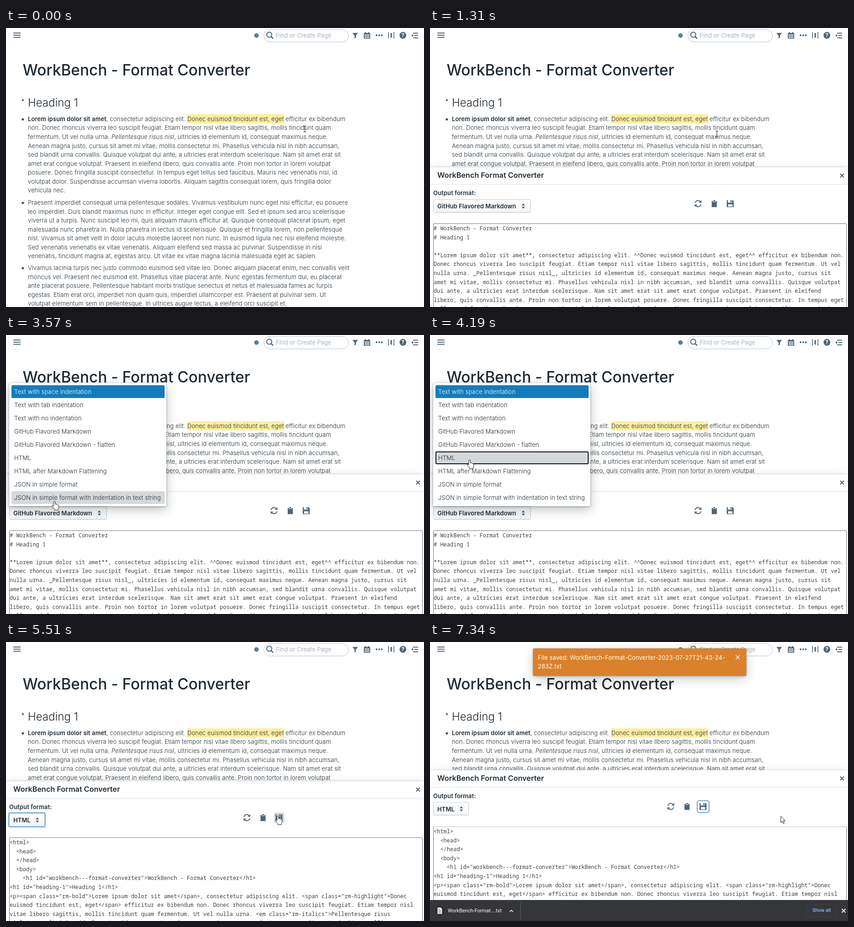
Recreate the animation shown at these times as an HTML page. Size 917 px wide and 611 px high, loop 7410 ms.

```html
<!DOCTYPE html>
<html lang="en">
<head>
<meta charset="utf-8">
<title>Format Converter</title>
<style>
html, body { margin: 0; width: 100%; height: 100%; overflow: hidden; background: #fff; }
#stage { position: relative; width: 917px; height: 611px; overflow: hidden; background: #fff;
  font: 300 13px/19.5px Inter, sans-serif; letter-spacing: .165px; color: #202b33; }
#stage div, #stage svg { position: absolute; }
svg { overflow: visible; }
.t, pre { position: absolute; margin: 0; white-space: pre; }
.icon { fill: #506575; }
.line { fill: none; stroke: #506575; stroke-width: 2; }
.b { font-weight: 600; letter-spacing: .08px; }
.anim { animation: 7410ms linear infinite; }
mark { background: #ffeea0; color: inherit; padding: 2px 1px; margin: 0 -1px; }

#title { left: 36.5px; top: 72px; font-size: 33.43px; font-weight: 500; letter-spacing: 0; line-height: 40px; }
#head { left: 48px; top: 149px; font-size: 24.1px; letter-spacing: 0; line-height: 30px; }
#search { left: 565px; top: 2.5px; width: 184.5px; height: 26px; border: 1px solid #bac4cb; border-radius: 15px; }
#hint { left: 592px; top: 7px; font-weight: 400; font-size: 12.95px; letter-spacing: 0; color: #a3b1bc; }

#panel { left: 0; top: 305px; width: 917px; height: 340px; background: #fff;
  box-shadow: 0 0 0 1px rgba(16,22,26,.08), 0 2px 7px rgba(16,22,26,.2), 0 5px 22px rgba(16,22,26,.15);
  animation-name: slide; }
#bar-line { left: 0; top: 37px; width: 917px; height: 1px; background: #dfe3e6; }
#name { left: 16px; top: 7px; font-size: 16.3px; letter-spacing: 0; line-height: 21px; }
#label { left: 7px; top: 46.5px; font-weight: 700; letter-spacing: 0; color: #3a4650; }
.select { left: 7px; top: 70px; height: 27px; border: 1px solid #c3cad0; border-radius: 3px;
  background: linear-gradient(#fff, #f3f5f7); box-shadow: 0 1px 1px rgba(16,22,26,.08); line-height: 28px; }
.select .t { left: 8px; top: 0; }
#md { width: 212px; animation-name: before; }
#html { width: 76px; animation-name: after; }
#ring { left: 5px; top: 68px; width: 78px; height: 29px; border: 2px solid #68aed8; border-radius: 4px; animation-name: ring; }
#tools { left: 570px; top: 60px; animation-name: tools; }
#hover { fill: #d9dfe4; animation-name: hover; }
#focus { fill: none; stroke: #5fa6d6; stroke-width: 2; animation-name: focus; }
#area { left: 7px; top: 123px; width: 905px; height: 240px; border: 1px solid #767676; border-radius: 2px; }
pre { left: 0; top: .3px; font: 12px/19.55px "Noto Sans Mono", "DejaVu Sans Mono", monospace; letter-spacing: 0; color: #404040; }
#mdText { animation-name: before; }
#htmlText { animation-name: after; }

#menu { left: 7px; top: 105px; width: 345px; height: 270px; background: #fff; border-radius: 3px;
  box-shadow: 0 0 0 1px rgba(16,22,26,.12), 0 2px 4px rgba(16,22,26,.2), 0 8px 24px rgba(16,22,26,.25);
  transform-origin: 50% 100%; animation-name: menu; }
#menu ul { margin: 0; padding: 5px 0 0 5px; list-style: none; line-height: 28.95px; position: relative; }
#menu li { width: 330px; padding-left: 6px; white-space: pre; }
#menu li:first-child { background: #137cbd; color: #fff; border-radius: 2px; height: 28px; line-height: 28px; margin-bottom: .95px; }
#pick { left: 5px; top: 150px; width: 336px; height: 28px; border-radius: 3px; background: #d5d9dc; animation-name: pick; }
#outline { left: 5px; top: 150px; width: 332px; height: 24px; border: 2px solid #111; border-radius: 3px; animation-name: outline; }

#toast { left: 226px; top: 14px; width: 468px; height: 60px; border-radius: 3px; background: #d9822b; color: #fff;
  font-weight: 400; letter-spacing: .07px;
  box-shadow: 0 0 0 1px rgba(16,22,26,.1), 0 2px 4px rgba(16,22,26,.2), 0 8px 24px rgba(16,22,26,.2);
  animation-name: toast; }
#toast .t { left: 10.5px; top: 10.5px; }
#shelf { left: 0; top: 565px; width: 917px; height: 46px; background: #35363a; color: #fff;
  font: 11px/16px Roboto, sans-serif; letter-spacing: 0; animation-name: shelf; }
#file { left: 39px; top: 16px; animation-name: reveal; }
#all { left: 826px; top: 9px; width: 64px; height: 26px; border: 1px solid #414246; border-radius: 4px;
  color: #8ab4f8; font-weight: 500; font-size: 10.8px; line-height: 26px; text-align: center; }
#end { animation-name: widen; }
#progress { fill: none; stroke: #8ab4f8; stroke-width: 1.6; animation-name: pulse; }
#drop { left: 28px; top: 544px; animation-name: drop; }
#cursor { left: 0; top: 0; animation-name: move; }
#cursor path { fill: #fff; stroke: #111; stroke-linejoin: round; }
#cursor #beam { fill: none; animation-name: beam; }
#arrow { animation-name: arrow; }
#hand { animation-name: hand; }

@keyframes slide {
  0%, 14.845% { transform: translateY(316px); animation-timing-function: cubic-bezier(.4,1,.75,.9); }
  17.544%, 77.19% { transform: none; }
  79.08%, 100% { transform: translateY(-24.5px); }
}
@keyframes before { 0% { opacity: 1; animation-timing-function: step-end; } 59.38%, 100% { opacity: 0; } }
@keyframes after { 0% { opacity: 0; animation-timing-function: step-end; } 59.38%, 100% { opacity: 1; } }
@keyframes ring {
  0% { opacity: 0; animation-timing-function: step-end; }
  59.38% { opacity: 1; animation-timing-function: step-end; }
  76.25%, 100% { opacity: 0; }
}
@keyframes tools { 0% { transform: none; animation-timing-function: step-end; } 59.38%, 100% { transform: translateX(-59.7px); } }
@keyframes hover {
  0% { opacity: 0; animation-timing-function: step-end; }
  73.4% { opacity: 1; animation-timing-function: step-end; }
  76.25%, 100% { opacity: 0; }
}
@keyframes focus { 0% { opacity: 0; animation-timing-function: step-end; } 76.25%, 100% { opacity: 1; } }
@keyframes menu {
  0%, 42.65% { opacity: 0; transform: scale(.6); animation-timing-function: cubic-bezier(.2,.9,.4,1.05); }
  44.5%, 57.9% { opacity: 1; transform: none; }
  59.38%, 100% { opacity: 0; transform: scale(.9); }
}
@keyframes pick {
  0% { opacity: 0; transform: none; animation-timing-function: step-end; }
  46.4% { opacity: 1; transform: translateY(87px); animation-timing-function: step-end; }
  48.3% { opacity: 1; transform: translateY(58px); animation-timing-function: step-end; }
  50.2% { opacity: 1; transform: translateY(29px); animation-timing-function: step-end; }
  52.1%, 100% { opacity: 1; transform: none; }
}
@keyframes outline { 0% { opacity: 0; animation-timing-function: step-end; } 55.6%, 100% { opacity: 1; } }
@keyframes toast {
  0%, 77.19% { opacity: 0; transform: translateY(-90px); animation-timing-function: cubic-bezier(.3,.8,.5,1); }
  80.03% { opacity: 1; transform: translateY(1.6px); }
  81.9%, 100% { opacity: 1; transform: none; }
}
@keyframes shelf { 0%, 77.19% { transform: translateY(48px); } 79.08%, 100% { transform: none; } }
@keyframes drop {
  0%, 78.14% { opacity: 0; transform: translateY(-45px); }
  79.5% { opacity: .85; transform: translateY(-12px); }
  80.5% { opacity: .85; transform: none; }
  87.5%, 100% { opacity: 0; transform: translateY(36px); }
}
@keyframes reveal {
  0%, 86.64% { clip-path: inset(0 100% 0 0); animation-timing-function: ease-out; }
  91.77%, 100% { clip-path: inset(0); }
}
@keyframes widen {
  0%, 86.64% { transform: none; animation-timing-function: ease-out; }
  91.77%, 100% { transform: translateX(112px); }
}
@keyframes pulse { 0%, 86.64% { opacity: 1; } 91.77% { opacity: .15; } 95.41% { opacity: .7; } 98.9%, 100% { opacity: 0; } }
@keyframes move {
  0%, 14.845% { transform: translate(655.5px, 221px); }
  17.68% { transform: translate(629.5px, 232px); }
  21.46% { transform: translate(520px, 320px); }
  25.24% { transform: translate(380px, 385px); animation-timing-function: ease-out; }
  30.9%, 38.19% { transform: translate(155px, 412px); }
  40.49%, 45.48% { transform: translate(112px, 389px); animation-timing-function: ease-in-out; }
  53.85%, 58.4% { transform: translate(87px, 273.5px); animation-timing-function: ease-in-out; }
  64.9% { transform: translate(160px, 390px); animation-timing-function: ease-in-out; }
  74.36%, 77.19% { transform: translate(596.5px, 380.5px); }
  80.03% { transform: translate(638px, 381.5px); animation-timing-function: ease-out; }
  85.7%, 100% { transform: translate(769.5px, 381.5px); }
}
@keyframes beam { 0% { opacity: 1; animation-timing-function: step-end; } 20.4%, 100% { opacity: 0; } }
@keyframes arrow {
  0% { opacity: 0; animation-timing-function: step-end; }
  20.4% { opacity: 1; animation-timing-function: step-end; }
  39.5% { opacity: 0; animation-timing-function: step-end; }
  59.4% { opacity: 1; animation-timing-function: step-end; }
  73.4% { opacity: 0; animation-timing-function: step-end; }
  77.6%, 100% { opacity: 1; }
}
@keyframes hand {
  0% { opacity: 0; animation-timing-function: step-end; }
  39.5% { opacity: 1; animation-timing-function: step-end; }
  59.4% { opacity: 0; animation-timing-function: step-end; }
  73.4% { opacity: 1; animation-timing-function: step-end; }
  77.6%, 100% { opacity: 0; }
}
</style>
</head>
<body>
<div id="stage">
  <div id="search"></div>
  <div id="hint" class="t">Find or Create Page</div>
  <svg width="917" height="611">
    <path class="line" d="M16 11h16M16 15.7h16M16 20.4h16M893 11.2h11M895.5 16.3h8.5M893 21.4h11"/>
    <circle cx="549.5" cy="16.5" r="5" fill="#568294"/>
    <g class="line"><circle cx="577.5" cy="14.7" r="5.6"/><path d="M581.5 18.7l4.6 4.4" stroke-width="2.6"/></g>
    <g class="icon">
      <path d="M760 10.8h12.2l-4.6 5.6v4.4l-3 2.2v-6.6z"/>
      <path d="M785 11h14v12.5h-14zM787.5 9h2.4v3h-2.4zM794 9h2.4v3H794z"/>
      <circle cx="813" cy="16" r="2"/><circle cx="818.7" cy="16" r="2"/><circle cx="824.4" cy="16" r="2"/>
      <path d="M838.2 9h1.6v14h-1.6zM850.4 9h1.6v14h-1.6zM843.6 11h3v10h-3z"/>
      <circle cx="870.7" cy="16" r="7.4"/>
      <path d="M889 16.3l4.2-3.2v6.4z"/>
    </g>
    <path d="M787 15h10M787 18h10M787 21h10" stroke="#fff" stroke-width="2" stroke-dasharray="2 .7"/>
    <text x="870.7" y="20.3" fill="#fff" font-size="12" font-weight="700" text-anchor="middle">?</text>
    <g fill="#46525c">
      <circle cx="37" cy="158" r="2.1"/><circle cx="37" cy="200" r="2.6"/>
      <circle cx="37" cy="383" r="2.6"/><circle cx="37" cy="526" r="2.6"/>
    </g>
  </svg>
  <div id="title" class="t">WorkBench - Format Converter</div>
  <div id="head" class="t">Heading 1</div>
  <div class="t" style="left:48px;top:189.5px"><span class="b">Lorem ipsum dolor sit amet</span>, consectetur adipiscing elit. <mark>Donec euismod tincidunt est, eget</mark> efficitur ex bibendum
non. Donec rhoncus viverra leo suscipit feugiat. Etiam tempor nisl vitae libero sagittis, mollis tincidunt quam</div>
  <div class="t" style="left:48px;top:229.3px">fermentum. Ut vel nulla urna. <i>Pellentesque risus nisl</i>, ultricies id elementum id, consequat maximus neque.
Aenean magna justo, cursus sit amet mi vitae, mollis consectetur mi. Phasellus vehicula nisl in nibh accumsan,
sed blandit urna convallis. Quisque volutpat dui ante, a ultricies erat interdum scelerisque. Nam sit amet erat sit
amet erat congue volutpat. Praesent in eleifend libero, quis convallis ante. Proin non tortor in lorem volutpat
posuere. Donec fringilla suscipit consectetur. In tempus eget tellus sed faucibus. Mauris nec venenatis nisl, id
volutpat dolor. Suspendisse accumsan viverra lobortis. Aliquam sagittis consequat lorem, quis fringilla dolor
vehicula nec.</div>
  <div class="t" style="left:48px;top:373px">Praesent imperdiet consequat urna pellentesque sodales. Vivamus vestibulum nunc eget nisi efficitur, eu posuere
leo imperdiet. Duis blandit maximus nunc in efficitur. Integer eget congue elit. Sed et ipsum sed arcu scelerisque
viverra ut a turpis. Nunc suscipit leo mi, quis aliquam mauris efficitur at. Quisque consequat placerat ipsum, eget
malesuada nunc pharetra in. Nulla pharetra in lectus id scelerisque. Quisque et fringilla lorem, non pellentesque
nisl. Vivamus sit amet velit in dolor iaculis molestie laoreet non nunc. In euismod ligula nec nisi eleifend molestie.
Sed venenatis venenatis ex vitae venenatis. Aliquam eleifend sed massa ac pulvinar. Suspendisse in nisi
venenatis, tincidunt magna at, egestas arcu. Ut vitae ex vitae magna lacinia malesuada eget ac sapien.</div>
  <div class="t" style="left:48px;top:516.2px">Vivamus lacinia turpis nec justo commodo euismod sed vitae leo. Donec aliquam placerat enim, nec convallis velit
rhoncus vel. Praesent nec euismod elit. Phasellus vitae placerat ante. Nunc egestas fermentum dui, eu placerat
ante placerat posuere. Pellentesque habitant morbi tristique senectus et netus et malesuada fames ac turpis
egestas. Etiam erat orci, imperdiet non quam quis, imperdiet ullamcorper est. Praesent at pulvinar sem. Ut
volutpat elementum sem in pellentesque. In ultrices augue lectus, a eleifend orci suscipit et.</div>

  <div id="panel" class="anim">
    <div id="name" class="t b">WorkBench Format Converter</div>
    <div id="bar-line"></div>
    <svg width="917" height="40"><path class="line" d="M900 14.3l8 8M908 14.3l-8 8"/></svg>
    <div id="label" class="t">Output format:</div>
    <div id="md" class="select anim">
      <div class="t b">GitHub Flavored Markdown</div>
      <svg class="icon" style="left:192.5px;top:14px" width="8" height="1"><path d="M0-1.3l3.7-4.5 3.7 4.5zM0 1.3l3.7 4.5 3.7-4.5z"/></svg>
    </div>
    <div id="html" class="select anim">
      <div class="t b">HTML</div>
      <svg class="icon" style="left:56.5px;top:14px" width="8" height="1"><path d="M0-1.3l3.7-4.5 3.7 4.5zM0 1.3l3.7 4.5 3.7-4.5z"/></svg>
    </div>
    <div id="ring" class="anim"></div>
    <svg id="tools" class="anim" width="110" height="40">
      <rect id="hover" class="anim" x="77.5" y="8.5" width="23" height="23" rx="3"/>
      <path class="line" d="M11.8 18a6.4 6.4 0 0 1 11.6-2.2M24.4 21.2a6.4 6.4 0 0 1-11.6 2.2"/>
      <g class="icon">
        <path d="M25.6 12v5.8h-5.8zM10.6 27.2v-5.8h5.8z"/>
        <path d="M48 14h2.5v2h6.2v-2h2.5v13.3H48zM51.4 15v-1.6l1.2-1.4h2l1.2 1.4V15z"/>
        <path fill-rule="evenodd" d="M81 12h2.5v5.5h9V12h1.5l2.3 2.3v13H81zM84 21h9.4v5H84z"/>
        <path d="M89 12h2.4v4.4H89z"/>
      </g>
      <rect id="focus" class="anim" x="76" y="7" width="26" height="26" rx="4"/>
    </svg>
    <div id="area">
      <pre id="mdText" class="anim"># WorkBench - Format Converter
# Heading 1

**Lorem ipsum dolor sit amet**, consectetur adipiscing elit. ^^Donec euismod tincidunt est, eget^^ efficitur ex bibendum non.
Donec rhoncus viverra leo suscipit feugiat. Etiam tempor nisl vitae libero sagittis, mollis tincidunt quam fermentum. Ut vel
nulla urna. _Pellentesque risus nisl_, ultricies id elementum id, consequat maximus neque. Aenean magna justo, cursus sit
amet mi vitae, mollis consectetur mi. Phasellus vehicula nisl in nibh accumsan, sed blandit urna convallis. Quisque volutpat
dui ante, a ultricies erat interdum scelerisque. Nam sit amet erat sit amet erat congue volutpat. Praesent in eleifend
libero, quis convallis ante. Proin non tortor in lorem volutpat posuere. Donec fringilla suscipit consectetur. In tempus eget
tellus sed faucibus. Mauris nec venenatis nisl, id volutpat dolor. Suspendisse accumsan viverra lobortis. Aliquam sagittis</pre>
      <pre id="htmlText" class="anim">&lt;html>
  &lt;head>
  &lt;/head>
  &lt;body>
    &lt;h1 id="workbench---format-converter">WorkBench - Format Converter&lt;/h1>
&lt;h1 id="heading-1">Heading 1&lt;/h1>
&lt;p>&lt;span class="rm-bold">Lorem ipsum dolor sit amet&lt;/span>, consectetur adipiscing elit. &lt;span class="rm-highlight">Donec
euismod tincidunt est, eget&lt;/span> efficitur ex bibendum non. Donec rhoncus viverra leo suscipit feugiat. Etiam tempor nisl
vitae libero sagittis, mollis tincidunt quam fermentum. Ut vel nulla urna. &lt;em class="rm-italics">Pellentesque risus
nisl&lt;/em>, ultricies id elementum id, consequat maximus neque. Aenean magna justo, cursus sit amet mi vitae, mollis</pre>
    </div>
  </div>

  <div id="menu" class="anim">
    <div id="pick" class="anim"></div>
    <div id="outline" class="anim"></div>
    <ul>
      <li>Text with space indentation</li>
      <li>Text with tab indentation</li>
      <li>Text with no indentation</li>
      <li>GitHub Flavored Markdown</li>
      <li>GitHub Flavored Markdown - flatten</li>
      <li>HTML</li>
      <li>HTML after Markdown Flattening</li>
      <li>JSON in simple format</li>
      <li>JSON in simple format with Indentation in text string</li>
    </ul>
  </div>

  <div id="toast" class="anim">
    <div class="t">File saved: WorkBench-Format-Converter-2023-07-27T21-43-24-
283Z.txt</div>
    <svg width="468" height="60"><path d="M444.5 15l9 9M453.5 15l-9 9" stroke="#fbe9d6" stroke-width="1.7"/></svg>
  </div>

  <div id="shelf" class="anim">
    <div id="file" class="t anim">WorkBench-Format....txt</div>
    <div id="all">Show all</div>
    <svg width="917" height="46">
      <circle cx="21.5" cy="23.5" r="10.5" fill="#2c2d30"/>
      <path d="M16.5 16.5h7l3 3v11h-10z" fill="#f1f3f4"/>
      <path d="M18.5 20.5h4M18.5 23h6M18.5 25.5h6M18.5 28h6" stroke="#6d7176"/>
      <circle id="progress" class="anim" cx="21.5" cy="23.5" r="10.6"/>
      <g id="end" class="anim" fill="none">
        <path d="M62.8 26l3.6-3.6 3.6 3.6" stroke="#f1f3f4" stroke-width="1.6"/>
        <path d="M86.5 5v37" stroke="#5d5f64"/>
      </g>
      <path d="M903.5 19.5l8 8M911.5 19.5l-8 8" stroke="#f1f3f4" stroke-width="1.8"/>
    </svg>
  </div>
  <svg id="drop" class="anim" width="1" height="1">
    <circle r="26" fill="#fff"/>
    <path d="M-4-16h8v8h5L0 2l-9-10h5zM-14 13h28v2.5h-28z" fill="#7db5f0"/>
  </svg>

  <svg id="cursor" class="anim" width="1" height="1">
    <path id="beam" class="anim" d="M-3-6.5h1.8q1.2 0 1.2 1.2v10.6q0 1.2-1.2 1.2H-3M3-6.5H1.2Q0-6.5 0-5.3M3 6.5H1.2Q0 6.5 0 5.3"/>
    <path id="arrow" class="anim" d="M0 0v14l3.2-3 2.3 5.2 2.2-1-2.2-5h4.5z"/>
    <path id="hand" class="anim" d="M-2 2a1.8 1.8 0 0 1 3.6 0v5l1-.6q1.6-.3 2 1.1 1.8-.6 2.4.8 1.9-.4 2.2 1.5v4q-.3 2.4-1.8 4v1.8H0v-1.8l-5-6.2q-1.2-2.6 1-2.6l2 1.8z"/>
  </svg>
</div>
</body>
</html>
```
